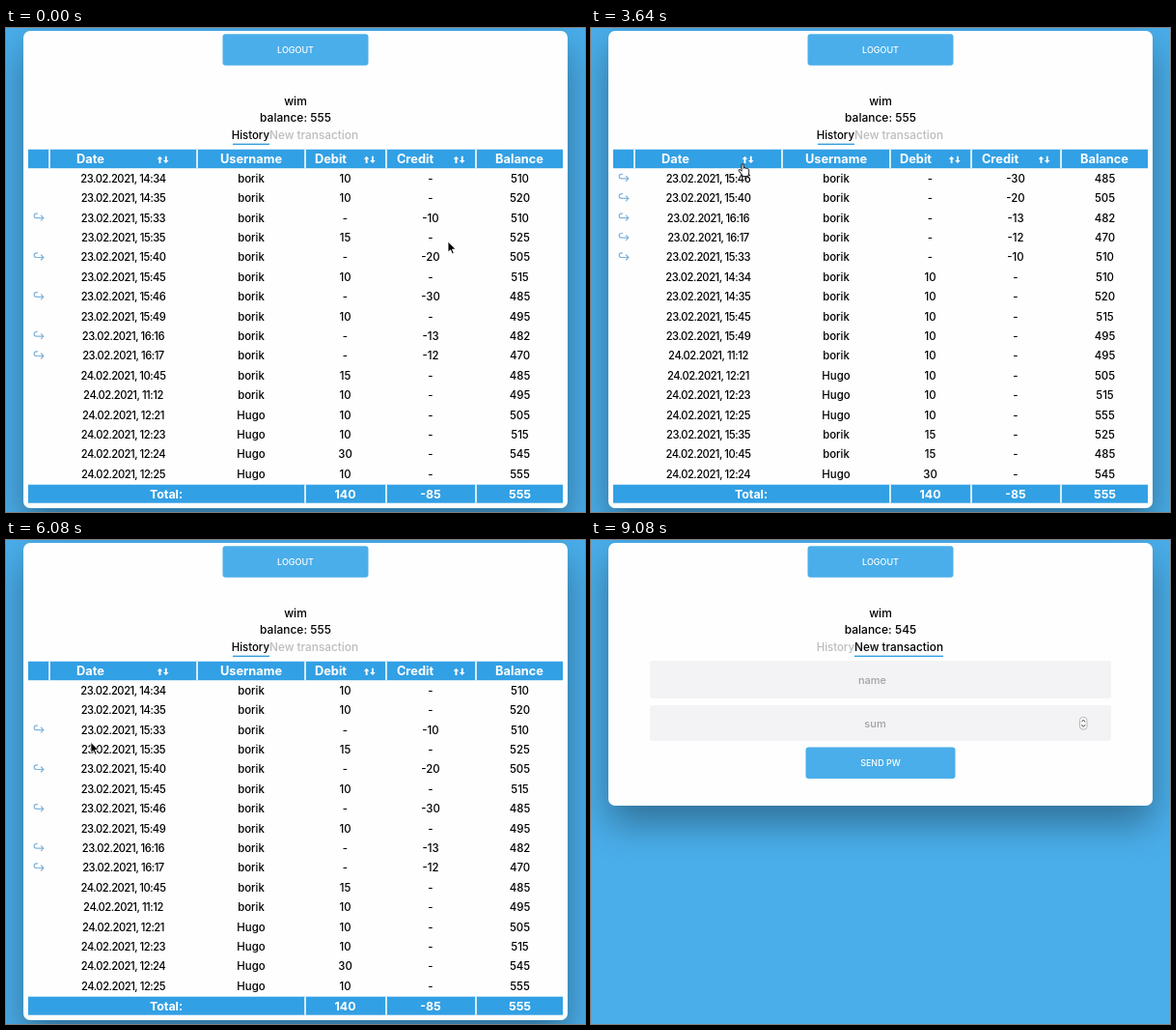
Write an HTML page that moves like this. It is 600 by 501 pixels and loops after 9.12 s.

```html
<!DOCTYPE html>
<html lang="en">
<head>
<meta charset="utf-8">
<title>Transactions</title>
<style>
  html, body { margin: 0; width: 100%; height: 100%; overflow: hidden; background: #4aaeea; }
  #card { position: absolute; left: 18px; top: 3px; width: 564px; height: 494px; border-radius: 7px;
    background: #fefefe; box-shadow: 0 18px 38px rgba(0, 0, 0, .36); }
  svg { position: absolute; left: 0; top: 0; }
  text { font: 500 11.4px Inter, sans-serif; text-anchor: middle; }
  text.date { font-size: 11.2px; letter-spacing: -.45px; }
  text.title { font-size: 12px; }
  text.tab { font-size: 11.8px; }
  text.head { font-size: 12.8px; font-weight: 700; fill: #fff; }
  text.foot { font-size: 12.4px; font-weight: 700; fill: #fff; }
  text.button { font-size: 9px; fill: #fff; }
  text.field { font-size: 11px; }
  #history { font-size: 11.4px; text-anchor: end; }
  #create { text-anchor: start; }
  .line { fill: none; stroke-linecap: round; stroke-linejoin: round; }
</style>
</head>
<body>
<div id="card"></div>
<svg id="stage" width="600" height="501" viewBox="0 0 600 501"></svg>
<script>
const LOOP = 9120, FORM_AT = 7080, SENT_AT = 8320;
const BLUE = '#4aaeea', HEADER = '#32a0e4';
const SORT_ICONS = [162.5, 376.7, 469.5];

// day, time, user, amount
const entries = [
  [23, '14:34', 'borik', 10], [23, '14:35', 'borik', 10], [23, '15:33', 'borik', -10],
  [23, '15:35', 'borik', 15], [23, '15:40', 'borik', -20], [23, '15:45', 'borik', 10],
  [23, '15:46', 'borik', -30], [23, '15:49', 'borik', 10], [23, '16:16', 'borik', -13],
  [23, '16:17', 'borik', -12], [24, '10:45', 'borik', 15], [24, '11:12', 'borik', 10],
  [24, '12:21', 'Hugo', 10], [24, '12:23', 'Hugo', 10], [24, '12:24', 'Hugo', 30],
  [24, '12:25', 'Hugo', 10]
];

const byDate = entries.map((_, i) => i);
const amount = i => entries[i][3];
const dateDown = [...byDate].reverse();
const amountUp = [...byDate].sort((a, b) => amount(a) - amount(b));
const amountDown = [...byDate].sort((a, b) => amount(b) - amount(a));
const sorts = [[0, byDate], [1300, amountUp], [2520, amountDown], [2960, amountUp],
  [3920, dateDown], [4660, byDate]];

// time, x, y of the pointer tip
const path = [
  [0, 458, 221], [200, 458, 221], [900, 377, 134], [1800, 377, 134], [2280, 461, 134],
  [2380, 468, 134], [3100, 468, 134], [3580, 157, 141], [4780, 157, 141], [5160, 294.5, 115],
  [5440, 294.5, 115], [6340, 36, 233], [6480, 36, 233], [6840, 33, 198], [7160, 33, 198],
  [7360, 144, 235], [7480, 273, 242], [7840, 298, 229], [LOOP, 298, 229]
];

const text = (x, y, s, cls, extra = '') => `<text x="${x}" y="${y}" class="${cls}" ${extra}>${s}</text>`;
const rect = (x, y, w, h, fill, extra = '') =>
  `<rect x="${x}" y="${y}" width="${w}" height="${h}" fill="${fill}" ${extra}/>`;
const rowY = i => 155.6 + 20.4 * i;

function tableMarkup() {
  const heads = [[87.5, 'Date'], [254, 'Username'], [336.5, 'Debit'], [424, 'Credit'], [532, 'Balance']];
  const totals = [[166, 'Total:'], [351.5, '140'], [440, '-85'], [532.5, '555']];
  const gaps = (xs, y, h) => xs.map(x => rect(x - .8, y, 1.6, h, '#fefefe')).join('');
  let balance = 500;
  const rows = entries.map(([day, time, user, sum]) => {
    balance += sum;
    const arrow = '<path class="line" stroke="#80b4dc" stroke-width="1.2" ' +
      'd="M-1.5-3.6h-1a2.3 2.3 0 0 0 0 4.6h7.3M2.4-1.5L4.9 1 2.4 3.5" transform="translate(34 -.7)"/>';
    return '<g class="row">' + (sum < 0 ? arrow : '') +
      text(121.5, 4.2, `${day}.02.2021, ${time}`, 'date') + text(254, 4.2, user, '') +
      text(351.5, 4.2, sum > 0 ? sum : '-', '') + text(440, 4.2, sum < 0 ? sum : '-', '') +
      text(532.5, 4.2, balance, '') + '</g>';
  }).join('');
  const icons = SORT_ICONS.map(x => `<path fill="#fff" transform="translate(${x} 136.4) scale(.93)"
    d="M-3.3-4l3 3.4h-2V4h-2V-.6h-2zM3.5 4l3-3.4h-2V-4h-2V.6h-2z"/>`).join('');
  return rect(23, 125.7, 554, 19.5, HEADER) + gaps([45, 198, 310, 394, 487], 125.7, 19.5) +
    heads.map(([x, s]) => text(x, 139.8, s, 'head')).join('') + icons + rows +
    rect(23, 472.7, 554, 19, HEADER) + gaps([310, 394, 487], 472.7, 19) +
    totals.map(([x, s]) => text(x, 486.7, s, 'foot')).join('');
}

const formMarkup = rect(61, 125, 478, 39, '#f3f2f5', 'rx="3"') +
  rect(61, 171, 478, 37, '#f3f2f5', 'rx="3"') +
  text(291.5, 148.5, '', 'field', 'id="name"') + text(294.5, 193.5, '', 'field', 'id="sum"') +
  `<g id="clear"><circle cx="499" cy="144.3" r="5" fill="#59595b"/>
    <path class="line" stroke="#fff" stroke-width="1.2" d="M497 142.3l4 4m0-4l-4 4"/></g>` +
  rect(506.5, 183.5, 7.5, 12.5, '#fafafa', 'rx="3" stroke="#aaa" stroke-width=".8"') +
  '<path class="line" stroke="#444" d="M508.7 188l1.6-1.8 1.6 1.8m-3.2 3.5l1.6 1.8 1.6-1.8"/>' +
  rect(222.5, 214.5, 155, 32.5, BLUE, 'rx="3" id="send"') + text(300, 234.2, 'SEND PW', 'button');

document.getElementById('stage').innerHTML =
  rect(224.5, 6.3, 151, 32.4, BLUE, 'rx="3"') + text(300, 26, 'LOGOUT', 'button') +
  text(300, 79.5, 'wim', 'title') + text(300, 97.3, '', 'title', 'id="balance"') +
  text(273, 115, 'History', 'tab', 'id="history"') +
  text(273, 115, 'New transaction', 'tab', 'id="create"') +
  rect(235, 119.6, 38, 1.4, HEADER, 'id="historyLine"') +
  rect(273, 119.6, 92, 1.4, HEADER, 'id="createLine"') +
  `<g id="table">${tableMarkup()}</g><g id="form">${formMarkup}</g>
  <g id="pointer">
    <path id="arrow" fill="#000" stroke="#fff" stroke-width=".9" stroke-linejoin="round"
      d="M0 0v11.2l2.6-2.4 1.8 4.1 1.9-.8-1.8-4h3.6z"/>
    <path id="hand" fill="#fff" stroke="#111" stroke-width="1" stroke-linejoin="round"
      d="M-1 .9q0-1.3 1.1-1.3t1.1 1.3v3.4q.2-.9 1.1-.8t1 1q.3-.6 1-.4t.8 1q.4-.5 1-.2t.6 1.3v2.6
      q0 1.4-.8 2.4v1.4H-.2v-1.2L-3.5 7.2q-.8-1.2 0-1.6t1.4.4L-1 7.2z"/>
  </g>`;

const $ = id => document.getElementById(id);
const rows = [...document.querySelectorAll('.row')];
const show = (id, on) => { $(id).style.display = on ? '' : 'none'; };

function pointerAt(t) {
  const i = path.findIndex(p => p[0] > t);
  const [t0, x0, y0] = path[i - 1], [t1, x1, y1] = path[i];
  const u = (t - t0) / (t1 - t0), k = u * u * (3 - 2 * u);
  return [x0 + (x1 - x0) * k, y0 + (y1 - y0) * k];
}

function setField(id, value, placeholder) {
  $(id).textContent = value || placeholder;
  $(id).setAttribute('fill', value ? '#111' : '#a2a2a5');
}

function draw(now) {
  const t = now % LOOP, form = t >= FORM_AT, sent = t >= SENT_AT;
  const [x, y] = pointerAt(t);
  const order = sorts.filter(s => s[0] <= t).pop()[1];
  order.forEach((id, i) => rows[id].setAttribute('transform', `translate(0 ${rowY(i)})`));

  const onTabs = y > 104 && y < 122 && x > 235 && x < 365;
  const onSort = !form && y > 126 && y < 145 && SORT_ICONS.some(c => Math.abs(x - c) < 7.5);
  const onReturn = !form && x > 28 && x < 40 &&
    order.some((id, i) => amount(id) < 0 && Math.abs(y - rowY(i)) < 6);
  const hand = onTabs || onSort || onReturn;
  const createOn = form || (onTabs && x > 273);

  $('card').style.height = (form ? 272 : 494) + 'px';
  show('table', !form);
  show('form', form);
  $('balance').textContent = 'balance: ' + (sent ? 545 : 555);
  $('history').setAttribute('fill', form ? '#bcbcc0' : '#000');
  $('create').setAttribute('fill', createOn ? '#000' : '#bcbcc0');
  show('historyLine', !form);
  show('createLine', createOn);
  setField('name', sent ? '' : 'borik', 'name');
  setField('sum', sent ? '' : '10', 'sum');
  show('clear', !sent);
  $('send').setAttribute('fill', t >= 7440 && !sent ? '#45a5e0' : BLUE);

  show('pointer', !sent);
  show('hand', hand);
  show('arrow', !hand);
  $('pointer').setAttribute('transform', `translate(${x} ${y})`);
}

const start = performance.now();
function tick() {
  draw(performance.now() - start);
  requestAnimationFrame(tick);
}
tick();
</script>
</body>
</html>
```
